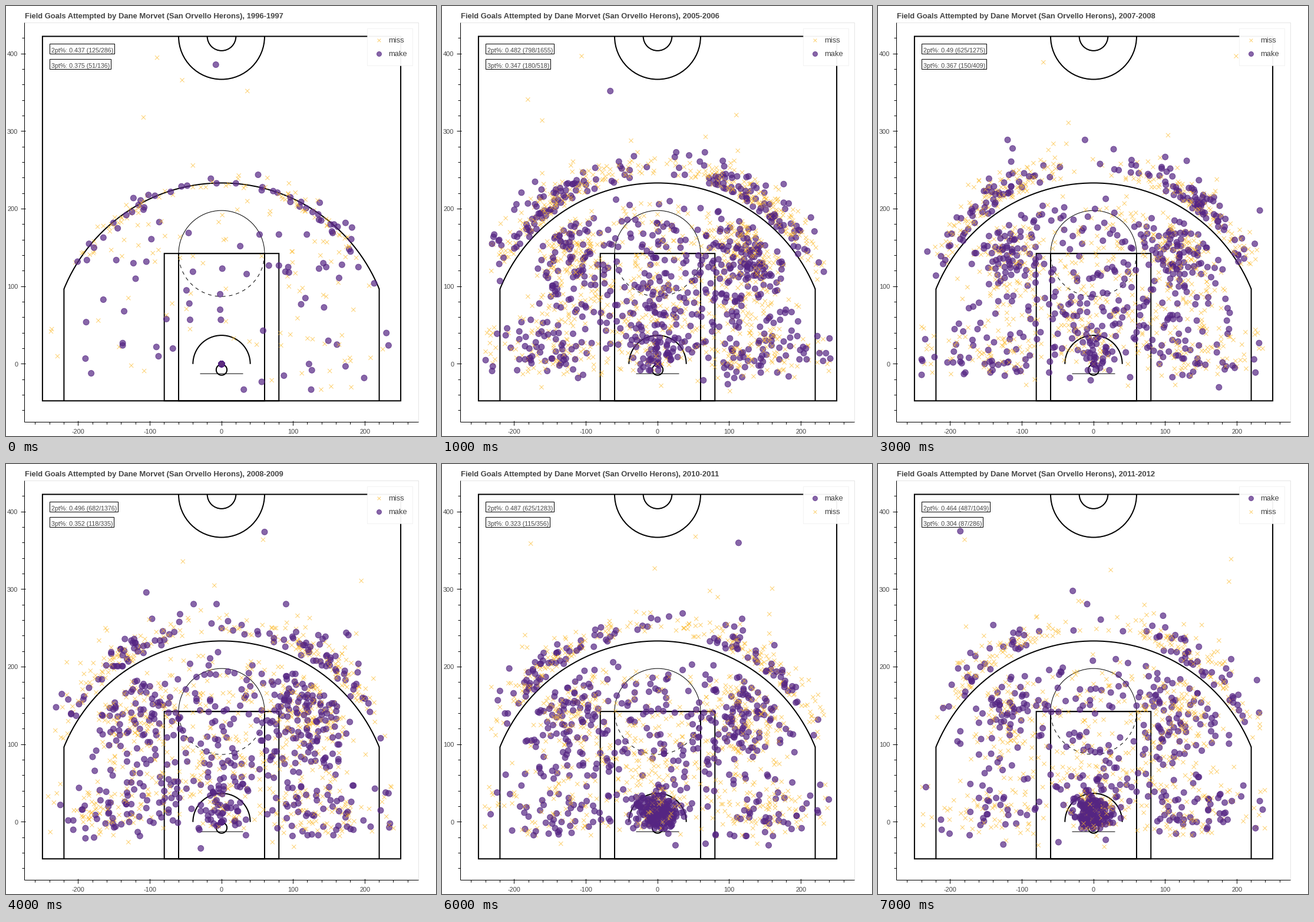
A matplotlib script that plays this animation: 730x730 px, repeating every 8000 ms.

```python
import numpy as np
import matplotlib.pyplot as plt
from matplotlib.animation import ArtistAnimation
from matplotlib.collections import PathCollection
from matplotlib.patches import Arc, Rectangle
from matplotlib.path import Path
from matplotlib.transforms import Affine2D, IdentityTransform

plt.rcParams["path.snap"] = False

SIZE, DPI = 730, 100
LEFT, RIGHT, TOP, BOTTOM = 31.5, 700.5, 28.5, 706.5
SX = (RIGHT - LEFT) / 550
SY = (BOTTOM - TOP) / 515
PURPLE = (85 / 255, 37 / 255, 131 / 255, 0.7)
GOLD = (253 / 255, 185 / 255, 39 / 255, 0.65)
CLEAR = (0, 0, 0, 0)
INK, PALE = "#444444", "#e5e5e5"
PLAYER, TEAM = "Dane Morvet", "San Orvello Herons"

# Favourite spots, mirrored left and right: x, y, spread x, spread y, share
SPOTS = np.array([
    (125, 147, 32, 27, 0.36),    # wing
    (145, 10, 42, 19, 0.20),     # baseline
    (110, 78, 45, 38, 0.21),     # side
    (0, 62, 38, 34, 0.14),       # paint
    (0, 165, 48, 28, 0.09),      # key
])

# First year, twos (made, tried), threes (made, tried), makes lead the legend
SEASONS = [
    (1996, (125, 286), (51, 136), False),
    (2005, (798, 1655), (180, 518), False),
    (2006, (676, 1359), (137, 396), True),
    (2007, (625, 1275), (150, 409), False),
    (2008, (682, 1376), (118, 335), False),
    (2009, (617, 1268), (99, 299), False),
    (2010, (625, 1283), (115, 356), True),
    (2011, (487, 1049), (87, 286), True),
]


def px(x):
    return LEFT + (x + 275) * SX


def py(y):
    return BOTTOM - (y + 75) * SY


def pt(pixels):
    return pixels * 72 / DPI


fig = plt.figure(figsize=(SIZE / DPI, SIZE / DPI), dpi=DPI, facecolor="white")
ax = fig.add_axes([0, 0, 1, 1])
ax.set(xlim=(0, SIZE), ylim=(SIZE, 0))
ax.axis("off")


def line(xs, ys, width=1):
    ax.plot(xs, ys, color="black", lw=pt(width), zorder=1,
            solid_capstyle="butt")


def box(x, y, w, h, width=1, edge="black", face="none", z=1):
    return ax.add_patch(Rectangle((x, y), w, h, lw=pt(width), ec=edge,
                                  fc=face, zorder=z))


def court_box(x, y0, y1):
    box(px(-x), py(y1), 2 * x * SX, (y1 - y0) * SY, 2)


def arc(y, radius, start=0, end=180, width=2, style="-"):
    """Arc on the centre line; angles run clockwise from the right."""
    d = 2 * radius * SX
    ax.add_patch(Arc((px(0), py(y)), d, d, theta1=start, theta2=end,
                     lw=pt(width), ec="black", ls=style, zorder=1))


def label(x, y, text, size=11, **kw):
    return ax.text(x, y, text, fontsize=pt(size), color=INK, zorder=5,
                   family="Liberation Sans", va="baseline", **kw)


def draw_court():
    court_box(250, -47.5, 422.5)
    court_box(80, -47.5, 142.5)
    court_box(60, -47.5, 142.5)
    for x in (-220, 220):
        line([px(x)] * 2, [py(-47.5), py(97)], 2)
    edge = np.degrees(np.arccos(220 / 237.5))
    arc(14, 237.5, 180 + edge, 360 - edge)
    arc(422.5, 60)
    arc(422.5, 20)
    arc(142.5, 60, 180, 360, 1)
    arc(142.5, 60, 0, 180, 1, (0, (6, 6)))
    arc(0, 40, 180, 360)
    arc(-7.5, 7.5, 0, 360)
    line([px(-30), px(30)], [py(-12.5)] * 2)


def draw_axes():
    box(LEFT, TOP, RIGHT - LEFT, BOTTOM - TOP, edge=PALE, z=0)
    line([LEFT, LEFT], [TOP, BOTTOM])
    line([LEFT, RIGHT], [BOTTOM, BOTTOM])
    for v in range(-260, 421, 20):
        major = v % 100 == 0
        inner, outer = (2, 6) if major else (0, 4)
        if v <= 260:
            x = np.floor(px(v)) + 0.5
            line([x, x], [BOTTOM - inner, BOTTOM + outer])
            if major:
                label(px(v), 726, str(v), ha="center")
        if v >= -60:
            y = np.floor(py(v)) + 0.5
            line([LEFT - outer, LEFT + inner], [y, y])
            if major:
                label(20.5, py(v) + 4, str(v), ha="right")


def marker(made, size):
    if made:
        return Path.unit_circle().transformed(Affine2D().scale(size / 2))
    a = size / 8 ** 0.5
    return Path([(-a, -a), (a, a), (-a, a), (a, -a)], [1, 2, 1, 2])


def marks(points, made, size, z):
    """Dots for makes and crosses for misses, drawn in the order given."""
    shapes = marker(False, size), marker(True, size)
    group = PathCollection(
        [shapes[int(m)] for m in made],
        facecolors=[PURPLE if m else CLEAR for m in made],
        edgecolors=[PURPLE if m else GOLD for m in made],
        linewidths=pt(1), offsets=points, offset_transform=ax.transData,
        zorder=z)
    group.set_transform(IdentityTransform())
    return ax.add_collection(group)


def threes(rng, n, early):
    """Mostly from both wings, just beyond the line; a few from the corners."""
    side = rng.choice([-1, 1], n)
    wing = 90 + side * rng.normal(34, 13, n)
    angle = np.where(rng.random(n) < 0.75, wing, rng.uniform(30, 150, n))
    angle = np.radians(np.clip(angle, 26, 154))
    r = 227 + rng.gamma(2, 4, n) if early else 241 + rng.gamma(2, 8, n)
    pts = np.column_stack([r * np.cos(angle), r * np.sin(angle)])
    pts[:, 0] = np.clip(pts[:, 0], -232, 232)
    k = n // 18
    pts[:k] = np.column_stack([side[:k] * rng.uniform(222, 242, k),
                               rng.uniform(-15, 50, k)])
    return pts


def twos(rng, n, centre, rim):
    """Some at the hoop, some around it, the rest from favourite spots."""
    at_hoop, near = round(n * centre), round(n * rim)
    close = rng.normal((0, 13), (14, 12), (near, 2))
    close[:, 1] = np.maximum(close[:, 1], -8)
    spot = SPOTS[rng.choice(len(SPOTS), 3 * n, p=SPOTS[:, 4])]
    far = rng.normal(spot[:, :2], spot[:, 2:4])
    far[:, 0] *= np.where(rng.random(3 * n) < 0.56, 1, -1)
    ok = ((np.hypot(*far.T) < 222) & (far[:, 1] > -18)
          & (abs(far[:, 0]) < 214))
    return np.vstack([np.zeros((at_hoop, 2)), close,
                      far[ok][:n - at_hoop - near]])


def habits(year, made):
    """Share of twos at the hoop centre and around it."""
    if year < 2000:
        return (0.55 if made else 0.5), 0
    if year < 2010:
        return (0.28, 0.05) if made else (0.1, 0.02)
    return 0, 0.32 if made else 0.12


def shots(year, two, three):
    rng = np.random.default_rng(year)
    groups = []
    for made in (True, False):
        n2, n3 = (a[0] if made else a[1] - a[0] for a in (two, three))
        pts = np.vstack([threes(rng, n3, year < 2000),
                         twos(rng, n2, *habits(year, made))])
        heaves = 1 if made else 4
        pts[-heaves:] = rng.uniform((-200, 280), (210, 400), (heaves, 2))
        pts[-8:-4] = rng.uniform((-210, -35), (210, -15), (4, 2))
        groups.append(pts)
    pts = np.round(np.vstack(groups))
    made = np.arange(len(pts)) < len(groups[0])
    order = rng.permutation(len(pts))
    pts, made = pts[order], made[order]
    return marks(np.column_stack([px(pts[:, 0]), py(pts[:, 1])]), made, 10, 2)


def stat(y, name, made, tried):
    text = label(76.7, y + 14.5, f"{name}%: {round(made / tried, 3)} "
                 f"({made}/{tried})", 10.67)
    width = text.get_window_extent().width + 5
    return [box(74.5, y, round(width), 17, face="white", z=3), text]


def season(year, two, three, make_first):
    title = label(31.5, 21, f"Field Goals Attempted by {PLAYER} ({TEAM}), "
                  f"{year}-{year + 1}", 13, weight="bold")
    order = [make_first, not make_first]
    names = [label(649, y, "make" if m else "miss", 13)
             for y, m in zip((62, 85), order)]
    key = marks([(633.5, 58.5), (633.5, 81.5)], order, 8, 5)
    return [shots(year, two, three), title, key, *names,
            *stat(64.5, "2pt", *two), *stat(90.5, "3pt", *three)]


draw_axes()
draw_court()
box(613.5, 38.5, 77, 63, edge=(0.9, 0.9, 0.9, 0.5), face=(1, 1, 1, 0.95), z=4)

anim = ArtistAnimation(fig, [season(*s) for s in SEASONS], interval=1000,
                       repeat=True, repeat_delay=0, blit=False)
plt.show()
```
